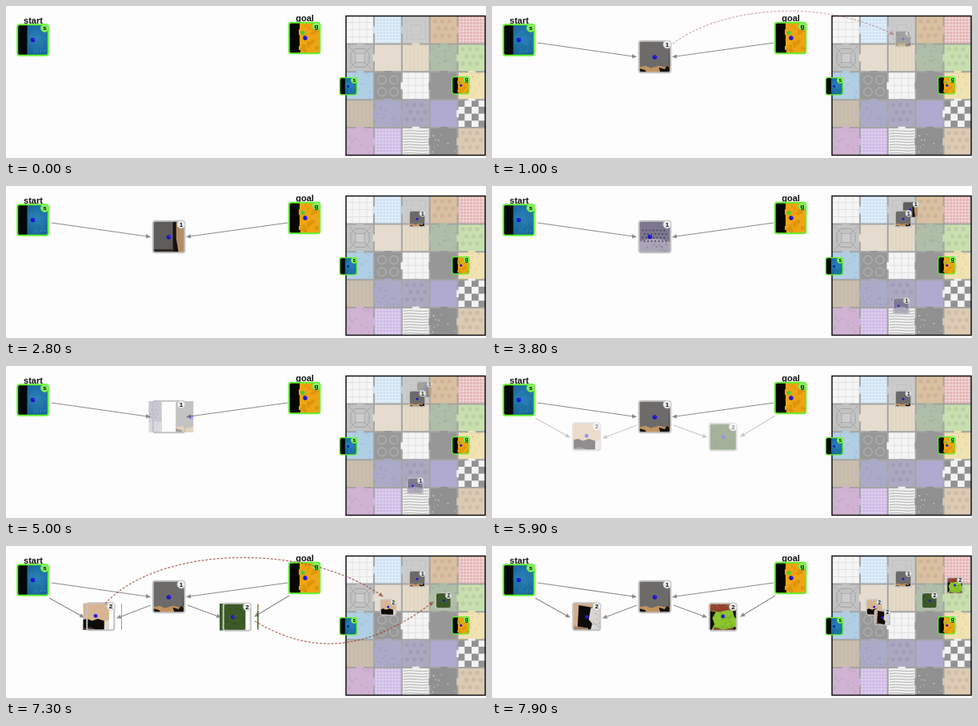
An HTML page that plays this animation: 600x190 px, repeating every 8000 ms.

```html
<!DOCTYPE html>
<html lang="en">
<head>
<meta charset="utf-8">
<title>Subgoal search</title>
<style>
html, body { margin: 0; width: 100%; height: 100%; overflow: hidden; background: #fdfdfe; }
svg { display: block; width: 600px; height: 190px; }
text { font-family: "Liberation Sans", Arial, sans-serif; text-anchor: middle; fill: #111; }
.title { font-size: 11px; font-weight: bold; }
</style>
</head>
<body>
<svg id="stage" viewBox="0 0 600 190"></svg>
<script>
const LOOP = 8000;
const PITCH = 55; // distance between pictures in a sliding strip
let seed = 7;
const rnd = () => (seed = (seed * 16807) % 2147483647) / 2147483647;

const rect = (x, y, w, h, fill, extra = '') =>
  `<rect x="${x}" y="${y}" width="${w}" height="${h}" fill="${fill}" ${extra}/>`;
const circle = (x, y, r, fill, extra = '') =>
  `<circle cx="${x}" cy="${y}" r="${r}" fill="${fill}" ${extra}/>`;
const path = (d, fill, extra = '') => `<path d="${d}" fill="${fill}" ${extra}/>`;
const line = (d, color, width = 1) => path(d, 'none', `stroke="${color}" stroke-width="${width}"`);

function specks(n, color, x, y, w, h, size) {
  let d = '';
  for (let i = 0; i < n; i++) {
    const s = size * (0.6 + rnd() * 0.6);
    const px = x + rnd() * (w - s), py = y + rnd() * (h - s);
    d += `M${px.toFixed(1)} ${py.toFixed(1)}h${s.toFixed(1)}v${s.toFixed(1)}h${(-s).toFixed(1)}z`;
  }
  return path(d, color);
}

function dots(color, x, y, w, h, step, r) {
  let out = '';
  for (let j = 0, py = y + step / 2; py < y + h; j++, py += step)
    for (let px = x + (j % 2 ? step : step / 2); px < x + w; px += step) out += circle(px, py, r, color);
  return out;
}

const agent = (x = 20, y = 20.5) => circle(x, y, 2.7, '#1a10cf') + circle(x + 1, y - 1, 1, '#3a35ff');

// Camera views, drawn in a 40 x 40 box
const pics = {
  start: rect(0, 0, 40, 40, 'url(#water)') + specks(22, '#2a7fb0', 14, 2, 24, 36, 2.4) +
    rect(0, 0, 13, 40, '#050708') + agent(20, 20),
  goal: rect(0, 0, 40, 40, '#efa412') + specks(20, '#dc940d', 15, 1, 25, 38, 4) +
    path('M0 0H14V9H13V16H14V30H13V35H15V40H0Z', '#070604') +
    circle(18, 13.5, 2.5, '#35d43a') + agent(21, 20),
  a: rect(0, 0, 40, 40, '#6c6b6a') + path('M0 33L9 31L15 34L25 31L33 33L40 29V40H0Z', '#c0935f') +
    path('M0 34L8 36L11 40H0ZM25 33L32 35L35 31L38 33V40H27Z', '#1a1310') +
    path('M38 10H40V32H37Z', '#4a382b') + agent(),
  b: rect(0, 0, 40, 40, '#5f5d5b') +
    path('M27 0H40V40H30L27 24Z', '#b48d66') + path('M25 0H29V22L32 40H25Z', '#17120f') +
    rect(0, 35, 26, 5, '#302b28') + agent(),
  c: rect(0, 0, 40, 40, '#7c778f') + path('M0 27Q18 18 40 27V40H0Z', '#aaa5b6') +
    dots('#443e58', 3, 10, 33, 18, 4.4, 0.9) + specks(16, '#837d95', 2, 28, 36, 11, 1.4) + agent(14, 20),
  l1: rect(0, 0, 40, 40, '#d8b592') +
    path('M0 25L8 23L15 26L23 23L32 26V40H0Z', '#0d0a09') + path('M0 37L12 35L20 38V40H0Z', '#54443a') +
    path('M33 27L40 24V40H32Z', '#dedad6') + agent(20, 19),
  l2: rect(0, 0, 40, 40, '#0d0b0a') + path('M0 0H40V5L27 7L9 4L7 40H0Z', '#cfae8d') +
    path('M26 8L40 4V40H25L28 30L23 24Z', '#d8d5d2') + specks(12, '#b7b3af', 27, 10, 13, 28, 2) +
    path('M0 34H9L22 36V40H0Z', '#a1805f') + agent(),
  r1: rect(0, 0, 40, 40, '#3b5a28') + specks(50, '#34511f', 0, 0, 40, 40, 2.2) +
    specks(25, '#446431', 0, 0, 40, 40, 2) + agent(21, 20),
  r2: rect(0, 0, 40, 40, '#8cc52f') + specks(24, '#7ab528', 0, 12, 40, 28, 3) +
    path('M0 0H40V12L28 10L14 13L0 10Z', '#91402c') + specks(12, '#a2513a', 0, 0, 40, 10, 2.5) +
    path('M0 11L10 13L5 21L8 30L3 40H0ZM33 10L40 12V24L36 20ZM35 34H40V40H33Z', '#15100c') +
    path('M8 34L20 38L34 35V40H6Z', '#7c4028') + agent(20, 19)
};

const view = (name, dx = 0) => `<use href="#${name}" x="${dx}"/>`;
const at = (x, y, size) => `transform="translate(${x} ${y}) scale(${size / 40})"`;

function frame(size, label, color, fill) {
  const k = 40 / size;
  const r = size < 25 ? 3.8 : 5;
  const fs = size < 25 ? 6.5 : 8;
  const cx = 40 - r * k, cy = r * k;
  return `<rect x="${0.7 * k}" y="${0.7 * k}" width="${40 - 1.4 * k}" height="${40 - 1.4 * k}" rx="${2.8 * k}"
    fill="none" stroke="${color}" stroke-width="${(size < 25 ? 1.3 : 2) * k}"/>` +
    circle(cx, cy, r * k, fill, `stroke="${color}" stroke-width="${0.8 * k}"`) +
    `<text x="${cx}" y="${cy + fs * 0.34 * k}" font-size="${fs * k}" font-weight="bold">${label}</text>`;
}

const GREEN = '#62f22e', GREY = '#c3c3c3';
const card = (pic, x, y, size, label, color = GREY, id = '') =>
  `<g id="${id || pic + x}" ${at(x, y, size)}>${view(pic)}${frame(size, label, color, color === GREEN ? '#86ee62' : '#e6e6e6')}</g>`;

const node = (id, names, x, y, size, label) =>
  `<g id="${id}" ${at(x, y, size)}><g clip-path="url(#window)"><g id="${id}Strip">` +
  names.map((n, i) => view(n, i * PITCH)).join('') +
  `</g></g>${frame(size, label, GREY, '#eeeeee')}</g>`;

const arrow = (x1, y1, x2, y2) =>
  `<path d="M${x1} ${y1}L${x2} ${y2}" stroke="#8c8c8c" stroke-width="1.2" marker-end="url(#head)"/>`;
const arc = (id, d) =>
  `<path id="${id}" d="${d}" fill="none" stroke="#9a4133" stroke-width="1.25" stroke-dasharray="3 1.8" marker-end="url(#redHead)"/>`;

// Floor plan: colour and floor style of each room
const rooms = [
  ['#f5f5f5', 'tile'], ['#cfe3f5', 'mesh'], ['#cbcbcb', 'square'], ['#dac0a0', 'spot'], ['#e6b6b7', 'mesh'],
  ['#c2c2c2', 'cross'], ['#e5dccf', 'plain'], ['#e4dac6', 'wood'], ['#afbea8', 'speck'], ['#c8dfae', 'spot'],
  ['#b0cfe4', 'speck'], ['#989898', 'ring'], ['#f4f4f4', 'tile'], ['#979797', 'plain'], ['#f1e2b2', 'speck'],
  ['#cabeae', 'wood'], ['#aaaac8', 'speck'], ['#aca8c1', 'spot'], ['#b0aad0', 'plain'], ['#f4f4f4', 'check'],
  ['#d0b2d2', 'speck'], ['#cdb6e5', 'mesh'], ['#efefef', 'stripe'], ['#909090', 'star'], ['#dccab2', 'spot']
];

function floor(style, x, y) {
  let d = '', out = '';
  const shade = 'rgba(70,60,80,.09)', light = 'rgba(255,255,255,.45)';
  switch (style) {
    case 'tile':
      for (let i = 8; i < 35; i += 9) d += `M${x + i} ${y}v35M${x} ${y + i}h35`;
      return line(d, '#dedede', 0.8);
    case 'mesh':
      for (let i = 3; i < 35; i += 4) d += `M${x + i} ${y}v35M${x} ${y + i}h35`;
      return line(d, light, 0.9);
    case 'wood':
      for (let i = 5; i < 35; i += 5) d += `M${x + i} ${y}v35`;
      return line(d, shade, 0.6);
    case 'stripe':
      for (let i = 4; i < 35; i += 3.5) d += `M${x + 2} ${y + i}q8 -1 16 0t15 0`;
      return line(d, '#b2b2b2', 1);
    case 'square':
      return line(`M${x + 6} ${y + 6}h23v23h-23zM${x + 11} ${y + 11}h13v13h-13z`, '#c0c0c0', 0.8);
    case 'cross':
      return line(`M${x + 3} ${y + 3}l29 29m0 -29l-29 29M${x + 11} ${y + 6}h13l5 6v11l-5 6h-13l-5 -6v-11z`, '#a0a0a0', 0.9) +
        rect(x + 12, y + 12, 11, 11, '#cdcdcd', 'stroke="#a0a0a0" stroke-width=".7"');
    case 'ring':
      for (const i of [10, 25]) for (const j of [10, 25])
        out += circle(x + i, y + j, 5.2, 'none', 'stroke="#c2c2c2" stroke-width=".8"');
      return out;
    case 'check':
      for (let i = 0; i < 4; i++) for (let j = 0; j < 4; j++)
        if ((i + j) % 2 === 0) out += rect(x + i * 8.7, y + j * 8.7, 8.7, 8.7, '#929292');
      return out;
    case 'spot': return dots(shade, x + 2, y + 2, 31, 31, 9, 2.6);
    case 'star': return specks(10, '#bdbdbd', x + 2, y + 2, 31, 31, 1.8);
    case 'speck': return specks(16, shade, x + 1, y + 1, 33, 33, 2.2);
  }
  return '';
}

function plan() {
  const x0 = 425, y0 = 12.5, step = 34.9;
  let out = '', walls = '', doors = '';
  rooms.forEach(([color, style], i) => {
    const c = i % 5, r = Math.floor(i / 5);
    const x = x0 + c * step, y = y0 + r * step;
    out += rect(x, y, step, step, color) + floor(style, x, y);
    if (c && (c + r) % 3) doors += rect(x - 1.3, y + 13, 2.6, 9, color);
    if (r && (c + 2 * r) % 3) doors += rect(x + 13, y - 1.3, 9, 2.6, color);
  });
  for (let i = 1; i < 5; i++)
    walls += `M${x0 + i * step} ${y0}v174.5M${x0} ${y0 + i * step}h174.5`;
  return out + line(walls, '#a4a4a4', 2) + doors +
    rect(x0, y0, 174, 174, 'none', 'stroke="#111" stroke-width="1.5"');
}

const marker = (id, color) =>
  `<marker id="${id}" viewBox="0 0 6 6" refX="5" refY="3" markerWidth="6" markerHeight="6"
    markerUnits="userSpaceOnUse" orient="auto">${path('M0 0.3L6 3L0 5.7Z', color)}</marker>`;

const stage = document.getElementById('stage');
stage.innerHTML = `<defs>
  <radialGradient id="water" cx=".65" cy=".45" r=".6">
    <stop offset="0" stop-color="#2883b6"/><stop offset="1" stop-color="#155f92"/>
  </radialGradient>
  <clipPath id="round"><rect x="1" y="1" width="38" height="38" rx="3"/></clipPath>
  <clipPath id="window"><rect x="-4.5" y="0" width="54.5" height="40"/></clipPath>
  ${marker('head', '#8c8c8c')}${marker('redHead', '#9a4133')}
  ${Object.entries(pics).map(([k, v]) => `<g id="${k}" clip-path="url(#round)">${v}</g>`).join('')}
  </defs>` +
  plan() +
  card('b', 512.5, 19, 21, '1', GREY, 'thumbB') +
  card('a', 503.5, 30.5, 21, '1', GREY, 'thumbA') +
  card('c', 501, 139.5, 21, '1', GREY, 'thumbC') +
  card('l1', 467.5, 66.5, 20.5, '2', GREY, 'thumbL1') +
  card('l2', 477.5, 79, 20.5, '2', GREY, 'thumbL2') +
  card('r1', 536.5, 58, 20.5, '2', GREY, 'thumbR1') +
  card('r2', 568, 39, 21, '2', GREY, 'thumbR2') +
  card('start', 416.5, 89, 22.5, 's', GREEN) +
  card('goal', 557, 88, 22.5, 'g', GREEN) +
  '<text class="title" x="34" y="22">start</text><text class="title" x="373.5" y="18.5">goal</text>' +
  card('start', 13.5, 22.5, 40, 's', GREEN) +
  card('goal', 353, 20, 40, 'g', GREEN) +
  `<g id="level1">${arrow(57, 46, 180, 63.5)}${arrow(352, 46, 226, 63.5)}` +
  node('mid', ['a', 'b', 'c', 'a'], 183, 43, 41, '1') + '</g>' +
  `<g id="level2">${arrow(54, 65, 97, 89)}${arrow(181, 74, 139, 90)}${arrow(227, 74, 268, 89)}${arrow(354, 62, 311, 88)}` +
  node('left', ['l1', 'l2'], 100.5, 70.5, 35.5, '2') +
  node('right', ['r1', 'r2'], 271, 71, 35.5, '2') + '</g>' +
  arc('arcMid', 'M226 47C285 3 405 -12 502 35.5') +
  `<g id="arcs2">${arc('arcL', 'M124 72C190 0 375 -6 471 63')}${arc('arcR', 'M311 94C375 132 445 138 534 70')}</g>`;

// Steps: [time, value], linear between
const fades = {
  level1: [[0, 0], [100, 0], [700, 1]],
  thumbA: [[800, 0], [1000, 0.45], [1500, 1]],
  arcMid: [[800, 0], [1000, 0.4], [1600, 1], [2100, 1], [2600, 0]],
  thumbB: [[2900, 0], [3400, 1], [4800, 1], [5000, 0.4], [5200, 0]],
  thumbC: [[3600, 0], [3800, 0.85], [4100, 1], [4900, 1], [5000, 0.9], [5500, 0]],
  midStrip: [[2100, 1], [2300, 0.5], [2600, 1], [3600, 1], [3700, 0.6], [3800, 1], [4800, 1], [5000, 0.4], [5400, 1]],
  level2: [[5650, 0], [6200, 1]],
  arcs2: [[6400, 0], [6600, 0.5], [6900, 1], [7200, 1], [7600, 0]],
  thumbL1: [[6400, 0], [6600, 0.4], [6900, 1]],
  thumbR1: [[6400, 0], [6600, 0.4], [6900, 1]],
  thumbL2: [[7450, 0], [7850, 1]],
  thumbR2: [[7450, 0], [7850, 1]]
};
const turn2 = [[7250, 0], [7650, 1]];
const slides = {
  midStrip: [[2100, 0], [2600, 1], [3600, 1], [3800, 2], [4800, 2], [5000, 2.5], [5400, 3]],
  leftStrip: turn2,
  rightStrip: turn2
};

function valueAt(steps, t) {
  if (t <= steps[0][0]) return steps[0][1];
  for (let i = 1; i < steps.length; i++) {
    const [t0, v0] = steps[i - 1], [t1, v1] = steps[i];
    if (t <= t1) return v0 + (v1 - v0) * (t - t0) / (t1 - t0);
  }
  return steps[steps.length - 1][1];
}

const el = id => document.getElementById(id);

function draw(t) {
  for (const id in fades) el(id).setAttribute('opacity', valueAt(fades[id], t));
  for (const id in slides)
    el(id).setAttribute('transform', `translate(${-PITCH * valueAt(slides[id], t)} 0)`);
}

const begin = performance.now();
function tick(now) {
  draw(Math.max(0, now - begin) % LOOP);
  requestAnimationFrame(tick);
}
draw(0);
requestAnimationFrame(tick);
</script>
</body>
</html>
```
